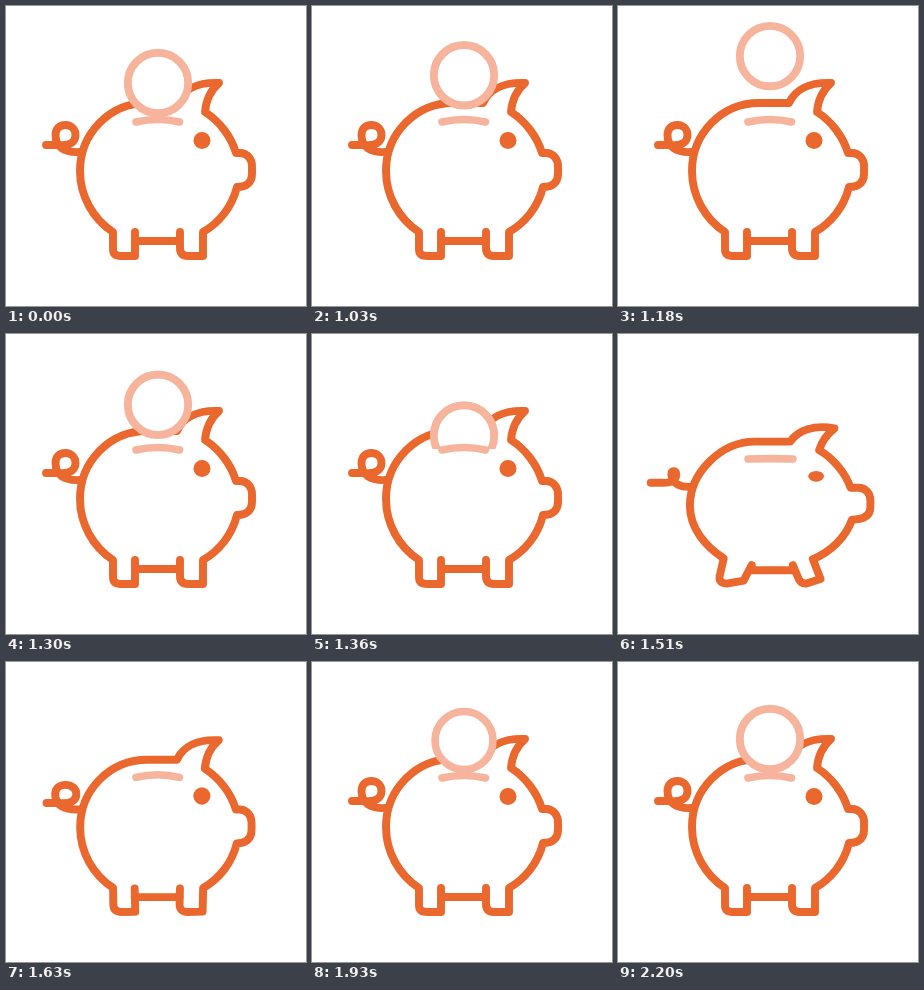
An HTML page for the animation above (2290 ms loop, 300 px wide and 300 px high).

```html
<!DOCTYPE html>
<html>
<head>
<meta charset="utf-8">
<style>
  html, body { margin: 0; height: 100%; overflow: hidden; background: #fff; }
  svg { display: block; width: 100%; height: 100%; }
</style>
</head>
<body>
<svg viewBox="0 0 300 300" fill="none" stroke="#ea672d" stroke-width="7.9" stroke-linecap="round" stroke-linejoin="round">
  <clipPath id="above"><rect id="mask" width="300"/></clipPath>
  <path id="pig"/>
  <path id="tail"/>
  <ellipse id="eye" fill="#ea672d" stroke="none"/>
  <g clip-path="url(#above)">
    <circle id="coin" r="30.2" fill="#fff" stroke="#f5b49b"/>
  </g>
  <path id="slot" stroke="#f5b49b" stroke-width="7.6"/>
</svg>
<script>
const LOOP = 2290, START = 1030, STEP = 30;

// Each shape: [standing, squashed]
const pig = [
  `M129 226 L129 250 L115 250 Q107 250 107 243 L107 226
   C87 213 74 190 74 165 C74 127 104 97 141 97 L171 97
   C177 84 191 76 213 77 C205 84 200 94 199 106
   C213 115 225 130 230 147 L234 147 C242 147 246 154 246 160
   L246 168 C246 176 241 181 231 181 C226 201 213 217 197 226
   L197 250 L182 250 Q174 250 174 242 L174 226 M129 235 L174 235`,
  `M140 238 L121 242 L100 249 Q88 248 96 234 L104 222
   C88 212 69 200 69 181 C69 153 103 122 131 122 L174 122
   C184 113 203 110 221 118 C215 122 209 126 204 130
   C218 137 230 150 236 163 L249 163 C257 163 261 169 261 175
   L261 180 C261 187 256 192 238 192 C230 207 212 219 192 224
   L210 238 L197 249 Q193 250 188 245 L176 238 M140 238 L176 238`
];
const tail = [
  `M40 139 L54 139 C65 140 69.5 135 69.5 129 C69.5 123 65 119 59.5 119
   C53 119 49.5 123 49.5 129 C49.5 141 58 147 74 146`,
  `M23 162 L30 162 C34 162 38 162 42 162 C45 162 48 162 51 162
   C54 162 57 162 60 162 C64 162 68 162 70 162`
];
const slot = ["M130 116 Q152 111 173.5 116", "M130 137 Q153 142.5 177 137"];

// Squash amounts over time; width and height settle in opposite directions
const squash = [[1390, 0], [1450, 1], [1480, .85], [1540, 0]];
const wideKeys = [...squash, [1630, -.03], [1690, 0]];
const tallKeys = [...squash, [1630, .03], [1690, 0]];
const tailKeys = [...squash, [1630, .09], [1690, 0]];
const popKeys = [[1780, 150], [1930, 78.5], [1980, 66], [2020, 64], [2080, 71], [2140, 75.5], [2200, 77]];
const sizeKeys = [[1780, .5], [1930, .96], [1960, 1]];

const $ = id => document.getElementById(id);
const lerp = (a, b, k) => a + (b - a) * k;
const set = (id, attrs) => {
  for (const name in attrs) $(id).setAttribute(name, attrs[name]);
};

function track(keys, t) {
  const i = keys.findIndex(key => key[0] > t);
  if (i < 0) return keys[keys.length - 1][1];
  if (i === 0) return keys[0][1];
  const [t0, a] = keys[i - 1], [t1, b] = keys[i];
  return lerp(a, b, (t - t0) / (t1 - t0));
}

// Path numbers alternate between x and y
function morph([from, to], kx, ky) {
  const ends = to.match(/[\d.]+/g);
  let i = 0;
  return from.replace(/[\d.]+/g, n => lerp(+n, +ends[i], i++ % 2 ? ky : kx));
}

function coinAt(t) {
  if (t < START) return [77, 1];
  if (t < 1780) return [50 + 20 * Math.abs((t - 1163) / 135) ** 2.5, 1];
  return [track(popKeys, t), track(sizeKeys, t)];
}

function draw(now) {
  const time = now % LOOP;
  const t = time < START ? 0 : START + Math.floor((time - START) / STEP) * STEP;
  const wide = track(wideKeys, t), tall = track(tallKeys, t);
  const [y, size] = coinAt(t);
  set("pig", { d: morph(pig, wide, tall) });
  set("tail", { d: morph(tail, wide, track(tailKeys, t)) });
  set("slot", { d: morph(slot, wide, wide) });
  set("eye", {
    cx: lerp(196, 201, wide), cy: lerp(134.5, 153, wide),
    rx: lerp(8.5, 7, wide), ry: lerp(8.5, 1, wide)
  });
  set("mask", { height: lerp(115, 138, wide) });
  set("coin", { transform: `translate(152 ${y}) scale(${size})` });
  requestAnimationFrame(draw);
}
draw(0);
</script>
</body>
</html>
```
